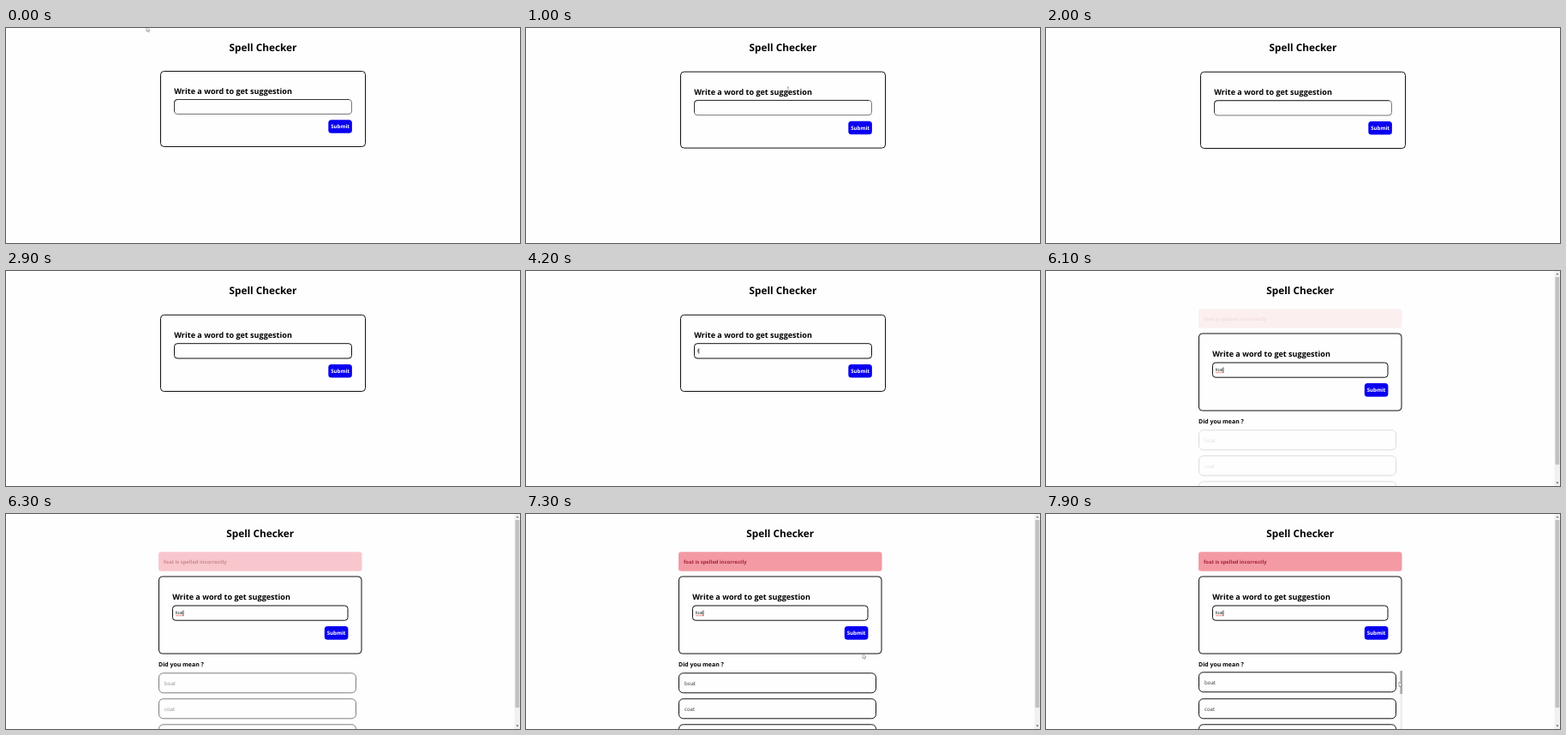
Animation of 600 by 251 pixels, one loop 8 s. Source, as an HTML page:

```html
<!DOCTYPE html>
<html lang="en">
<head>
<meta charset="utf-8">
<title>Spell Checker</title>
<style>
  html, body { margin: 0; width: 100%; height: 100%; overflow: hidden; background: #fefefe; }
  svg { display: block; width: 600px; height: 251px; }
  text { font-family: "Open Sans", "Noto Sans", sans-serif; font-weight: 700; text-rendering: geometricPrecision; }
  .title { font-size: 11.8px; text-anchor: middle; }
  .label { font-size: 9.05px; }
  .submit { font-size: 6.15px; fill: #fff; text-anchor: middle; }
  .typed { font: 5.2px "Liberation Sans", Arial, sans-serif; fill: #222; }
  .alert { font-size: 5.87px; fill: #a92438; }
  .heading { font-size: 6.95px; }
  .item text { font-size: 6.1px; font-weight: 400; fill: #333; }
  .box { fill: #fefefe; stroke: #111; }
</style>
</head>
<body>
<svg viewBox="0 0 600 251">
  <rect width="600" height="251" fill="#fefefe"/>
  <text id="title" class="title">Spell Checker</text>

  <rect id="card" class="box" rx="4"/>
  <text id="label" class="label">Write a word to get suggestion</text>
  <rect id="input" class="box" rx="3.5"/>
  <path id="inset" fill="none" stroke="#333"/>
  <text id="typed" class="typed"></text>
  <path id="squiggle" fill="none" stroke="#e33" stroke-width=".6"/>
  <path id="caret" stroke="#111" stroke-width=".7"/>
  <rect id="button" rx="3.5" fill="#0a00f0"/>
  <text id="submit" class="submit">Submit</text>

  <g id="results">
    <g id="alert">
      <rect x="178" y="44.3" width="237.5" height="22.5" rx="3" fill="#f39aa4"/>
      <text class="alert" x="184" y="58">foat is spelled incorrectly</text>
    </g>
    <text class="heading" x="178" y="178">Did you mean ?</text>
    <g id="items"></g>
    <rect id="listBar" x="413.3" y="183" width="2.7" height="27" fill="#aaa"/>
    <rect id="listTrack" x="413.3" y="210" width="2.7" height="41" fill="#eee"/>
    <rect x="593.5" width="6.5" height="251" fill="#f1f1f1"/>
    <rect x="594.5" y="7" width="4.8" height="219" fill="#c1c1c1"/>
    <path d="M595.4 4.2l1.5-1.8 1.5 1.8zM595.4 246.6l1.5 1.8 1.5-1.8z" fill="#555"/>
  </g>

  <path id="beam" d="M-1 -3.5h2M0 -3.5v7M-1 3.5h2" fill="none" stroke="#666" stroke-width=".6"/>
  <path id="arrow" d="M0 0V5.6L1.3 4.5 2.2 6.4 3.1 6 2.2 4.1H4Z" fill="#fff" stroke="#777" stroke-width=".6"/>
</svg>
<script>
const LOOP = 8000, FRAME = 100, SUBMIT_AT = 6000;
const $ = id => document.getElementById(id);
const set = (id, attrs) => {
  for (const name in attrs) $(id).setAttribute(name, attrs[name]);
};
const show = (id, on) => set(id, { visibility: on ? "visible" : "hidden" });
const clamp = v => Math.min(1, Math.max(0, v));
const ramp = (t, from, to) => clamp((t - from) / (to - from));
const lerp = (a, b, p) => a + (b - a) * p;
const rect = (id, x, y, right, bottom) =>
  set(id, { x, y, width: right - x, height: bottom - y });

// Horizontal extents plus the vertical positions of every form part.
const wide = { mid: 300, left: 180.5, right: 419.5, inLeft: 196.5, inRight: 403.5 };
const opening = { ...wide, title: 26.5, top: 50.5, bottom: 138.5, label: 76.6,
  inTop: 83.5, inBottom: 100.5, btnTop: 107.3, btnBottom: 122.7 };
const settled = { ...wide, title: 27, top: 51.3, bottom: 140.5, label: 78,
  inTop: 84.7, inBottom: 102, btnTop: 109, btnBottom: 124.6 };
const submitted = { mid: 296.7, left: 178.5, right: 415, inLeft: 194.5, inRight: 399,
  title: 27, top: 73, bottom: 163, label: 100.2,
  inTop: 107, inBottom: 124.2, btnTop: 131, btnBottom: 146.8 };

function layoutAt(t) {
  if (t >= SUBMIT_AT) return submitted;
  const p = ramp(t, 600, 1100), mix = {};
  for (const key in opening) mix[key] = lerp(opening[key], settled[key], p);
  return mix;
}

const keyTimes = [4200, 4300, 4500, 4700];
const typedAt = t => "foat".slice(0, keyTimes.filter(k => t >= k).length);

// Caret states as [start, end) spans.
const caretSpans = [[2400, 2900], [3400, 3900], [4200, 5200], [5700, 6800], [7300, LOOP]];
const caretAt = t => caretSpans.some(([a, b]) => t >= a && t < b);

function along(path, t) {
  const i = path.findIndex(k => k[0] > t);
  if (i < 0) return path[path.length - 1].slice(1);
  const [a, b] = [path[i - 1], path[i]], p = ramp(t, a[0], b[0]);
  return [lerp(a[1], b[1], p), lerp(a[2], b[2], p)];
}
const beamPath = [[100, 306, 72.5], [1400, 306, 72.5], [1900, 219, 93]];
const arrowPath = [[7300, 393, 163], [7500, 430, 188], [7600, 427, 198], [7900, 412, 196]];
const place = (id, [x, y]) => set(id, { transform: `translate(${x} ${y})` });

function buildItems() {
  $("items").innerHTML = ["boat", "coat", "goat"].map((word, i) =>
    `<g class="item" id="item${i}"><rect class="box" x="178.5" y="${185.8 + i * 30}" width="230" height="23" rx="5"/>
     <text x="185" y="${199.8 + i * 30}">${word}</text></g>`).join("");
}

function drawForm(t) {
  const f = layoutAt(t), focused = t >= 2400, word = typedAt(t);
  set("title", { x: f.mid, y: f.title });
  rect("card", f.left, f.top, f.right, f.bottom);
  set("label", { x: f.inLeft - 0.3, y: f.label });
  rect("input", f.inLeft, f.inTop, f.inRight, f.inBottom);
  $("input").style.stroke = focused ? "#111" : "#777";
  set("inset", { d: `M${f.inLeft} ${f.inBottom - 3}V${f.inTop + 3.5}q0-3.5 3.5-3.5H${f.inRight - 3}` });
  show("inset", !focused);

  const btnRight = f.inRight + 0.4, btnLeft = btnRight - 27.6;
  rect("button", btnLeft, f.btnTop, btnRight, f.btnBottom);
  set("submit", { x: (btnLeft + btnRight) / 2, y: (f.btnTop + f.btnBottom) / 2 + 2.2 });

  const x = f.inLeft + 3.4, base = f.inBottom - 6.8;
  $("typed").textContent = word;
  set("typed", { x, y: base });
  const end = x + (word ? $("typed").getComputedTextLength() : 0) + 0.4;
  set("caret", { d: `M${end} ${base - 5}v6.5` });
  show("caret", caretAt(t));
  set("squiggle", { d: `M${x} ${base + 1.5}` + "l.75-.6 .75.6".repeat(6) });
  show("squiggle", t >= 5800);
}

function drawResults(t) {
  set("results", { display: t >= SUBMIT_AT ? "inline" : "none" });
  const opacity = ramp(t, 6030, 6530);
  set("alert", { opacity });
  set("items", { opacity });
  const hover = t >= 7700;
  place("item0", [0, hover ? -1 : 0]);
  show("listBar", hover);
  show("listTrack", hover);
}

function drawPointer(t) {
  const arrow = t < 100 || t >= 7300;
  show("arrow", arrow);
  show("beam", t >= 100 && t < 1900);
  if (arrow) place("arrow", t < 100 ? [164, -1.5] : along(arrowPath, t));
  else place("beam", along(beamPath, t));
}

function draw(t) {
  drawForm(t);
  drawResults(t);
  drawPointer(t);
}

buildItems();
const start = performance.now();
function tick() {
  const t = (performance.now() - start) % LOOP;
  draw(Math.floor(t / FRAME) * FRAME);
  requestAnimationFrame(tick);
}
tick();
</script>
</body>
</html>
```
